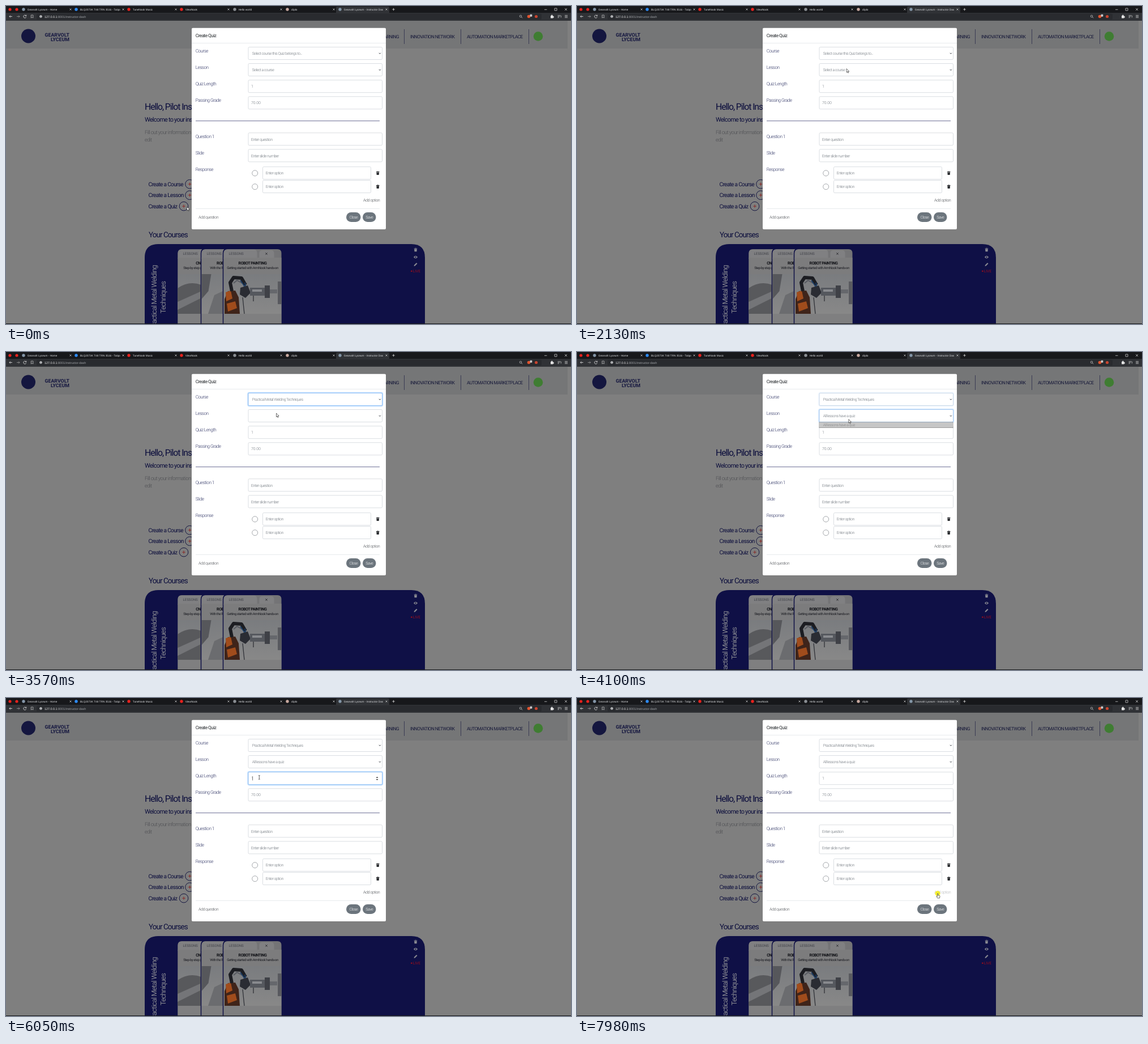
Write an HTML page that moves like this. It is 998x561 px and loops after 8 s.

```html
<!DOCTYPE html>
<html lang="en">
<head>
<meta charset="utf-8">
<title>Create Quiz</title>
<style>
html, body { margin: 0; width: 100%; height: 100%; overflow: hidden; background: #7f7f7f; }
svg { display: block; width: 998px; height: 561px; font-weight: 300; }
text { font-family: Roboto, "Liberation Sans", sans-serif; letter-spacing: -.068em; text-rendering: geometricPrecision; white-space: pre; }
.ui { font-family: "Liberation Sans", Arial, sans-serif; font-weight: 400; letter-spacing: 0; }
.wide { letter-spacing: 0; }
</style>
</head>
<body>
<svg id="stage" viewBox="0 0 998 561"></svg>
<script>
const LOOP = 8000;
const stage = document.getElementById('stage');
const COURSE = 'Practical Metal Welding Techniques';
const NO_LESSON = 'All lessons have a quiz';
const NAVY = '#0b0d3c', PANEL = '#0f1046', LABEL = '#2f3464', GREY = '#666d75';

const text = (x, y, size, fill, str, extra = '') =>
  `<text x="${x}" y="${y}" font-size="${size}" fill="${fill}" ${extra}>${str}</text>`;
const rect = (x, y, w, h, fill, extra = '') =>
  `<rect x="${x}" y="${y}" width="${w}" height="${h}" fill="${fill}" ${extra}/>`;
const dot = (x, y, r, fill, extra = '') =>
  `<circle cx="${x}" cy="${y}" r="${r}" fill="${fill}" ${extra}/>`;
const line = (d, stroke, width = 1, extra = '') =>
  `<path d="${d}" fill="none" stroke="${stroke}" stroke-width="${width}" ${extra}/>`;
const shape = (d, fill, extra = '') => `<path d="${d}" fill="${fill}" ${extra}/>`;
const group = (id, body, extra = '') => `<g id="${id}" ${extra}>${body}</g>`;
const cross = (x, y, r, color, w) =>
  line(`M${x - r} ${y - r}l${2 * r} ${2 * r}m0 ${-2 * r}l${-2 * r} ${2 * r}`, color, w);
const plus = (x, y, r, color, w) => line(`M${x - r} ${y}h${2 * r}M${x} ${y - r}v${2 * r}`, color, w);
const trash = (x, y, color) =>
  shape(`M${x - 2.8} ${y - 2.6}h1.8l.4-.7h1.2l.4.7h1.8v.9h-5.6zM${x - 2.4} ${y - 1.3}h4.8l-.4 4.6h-4z`, color);

function browser() {
  const tabs = [
    [31, 'Gearvolt Lyceum - Home', '#8496a8', 114],
    [124, 'BLQ2073K T48 TRN 3516 - Talqo', '#2d8cff', 207],
    [217, 'TuneNook Music', '#e8211d', 300],
    [310, 'ViewNook', '#e8211d', 393],
    [404, 'Hello world', '#8b8f94', 486],
    [497, 'cliplo', '#c9a9a0', 579],
    [590, 'Gearvolt Lyceum - Instructor Das', '#8496a8', 672],
  ];
  let s = rect(0, 0, 998, 12, '#17181b') + rect(0, 12, 998, 14, '#303236') +
    shape('M583 12V3q0-2 2-2h90q2 0 2 2v9z', '#303236') +
    rect(54, 13.5, 892, 10.5, '#292b2f', 'rx="2"') +
    dot(7, 6, 2.6, '#e8211d') + dot(19, 6, 2.6, '#e8211d');
  for (const [x, name, color, end] of tabs)
    s += dot(x, 6, 2.7, color) + text(x + 6.7, 7.7, 4.75, '#dcdee0', name, 'class="ui"') + cross(end, 6, 1.5, '#d8d8d8', .7);
  s += plus(684.5, 6, 2.2, '#ddd', .8) + line('M951 6.3h4.5M969 4h4v4h-4z', '#ddd', .7) + cross(989, 6, 2, '#ddd', .7);
  s += line('M11 18.5h-5m2-2l-2 2 2 2', '#e2e2e2', .8) + line('M19 18.5h5m-2-2l2 2-2 2', '#9a9a9a', .8) +
    line('M35.4 17.2a2.5 2.5 0 1 0 .3 2.2M35.8 15.6v2h-2', '#e2e2e2', .8) +
    line('M44.3 16h3.6v5l-1.8-1.4-1.8 1.4z', '#cfcfcf', .7) +
    dot(61.5, 18.5, 2.2, '#d0d2d4') + line('M61.5 17v.6m0 .5v2', '#292b2f', .6) +
    `<text class="ui" x="68" y="20.5" font-size="5.4" fill="#f0f0f0">127.0.0.1<tspan fill="#a0a3a7">:8001/instructor-dash</tspan></text>` +
    dot(909, 18, 1.8, 'none', 'stroke="#ccc" stroke-width=".7"') + line('M910.4 19.4l1.8 1.8', '#ccc', .8) +
    dot(923.5, 18.5, 2.8, '#e0542f') + rect(925.5, 14.8, 3.8, 4, '#c9cacc', 'rx=".8"') + dot(936.5, 18.5, 2.6, '#c8442f') +
    shape('M962 17h1.4a1 1 0 1 1 1.8 0h1.3v1.5a1 1 0 1 1 0 1.7v1.3h-4.5z', '#e4e4e4') +
    line('M974.5 16.8h5m-5 1.8h3.4m-3.4 1.8h2.4m3.4-3.6v3.6', '#ddd', .7) +
    line('M987 16.6h5m-5 1.9h5m-5 1.9h5', '#ddd', .7);
  return s;
}

function card(x, title, sub, scene) {
  const mid = x + 51;
  const outline = `M${x} 561V436q0-7 7-7h88q7 0 7 7v125`;
  return line(outline, PANEL, 3.5) + shape(outline + 'z', '#747476') +
    shape(`M${x} 446v-10q0-6.5 7-6.5h46q6 0 6 6v8.5h4v-8q0-5 5-5h16q5 0 5 5v10z`, '#808082') +
    rect(x, 444, 102, 29, '#7c7c7d') +
    text(x + 9, 439, 6.1, '#3f4048', 'LESSONS', 'class="wide"') + cross(x + 75.5, 437, 1.8, '#26272c', .8) +
    text(mid, 455.8, 7.1, '#101116', title, 'text-anchor="middle" font-weight="bold"') +
    text(mid, 464, 6, '#1b1c22', sub, 'text-anchor="middle"') +
    rect(x, 473, 102, 70, 'url(#photo)') + scene + rect(x, 543, 102, 18, '#7f7f80');
}

function robot() {
  return shape('M386 543v-26l6-14 13-1 6 12 2 29z', '#3f241a') +
    shape('M388 505l9-3 3 14-11 5zM390 525l15-4 3 12-16 6z', '#a04c1c') +
    line('M399 503l-3-15 6-9 14 1 7 12', '#1c1d22', 6, 'stroke-linejoin="round"') +
    line('M402 489l6-5 9 5', '#585b62', 2) +
    line('M414 484l7 10-3 13M422 488l3 14', '#1a3c66', 1.8) +
    shape('M414 497l13-4 5 13-9 9-10-6z', '#2a2c33') +
    rect(431, 497, 26, 14, '#55585e') + rect(435, 500, 17, 4, '#888a8e') +
    rect(457, 493, 9, 22, '#3f4147') + rect(466, 500, 13, 7, '#65676c') + rect(480, 486, 6.5, 40, '#595a5f') +
    line('M418 514l3 29M437 511v10', '#303238', 1.3);
}

function page() {
  const adds = [['Course', 317.5, 324.5], ['Lesson', 337, 324.5], ['Quiz', 356.5, 314]];
  let s = rect(0, 26, 998, 535, '#7f7f7f') + rect(0, 26, 992, 49, '#757677') +
    dot(39.5, 53, 12.5, '#14163f') +
    text(112, 54, 8.8, '#14163f', 'GEARVOLT', 'font-weight="bold" text-anchor="end" class="wide"') +
    text(112, 62, 8.8, '#14163f', 'LYCEUM', 'font-weight="bold" text-anchor="end" class="wide"') +
    text(694, 57.3, 8.2, '#181a3a', 'LEARNING', 'text-anchor="end"') +
    text(714, 57.3, 8.2, '#181a3a', 'INNOVATION NETWORK') +
    text(814, 57.3, 8.2, '#181a3a', 'AUTOMATION MARKETPLACE') +
    line('M703.5 41v26M803.5 41v26M923.5 41v26', '#2c2e4c', .8) +
    dot(940, 53.5, 8.3, '#3f7d32') +
    text(245, 182.5, 15.8, NAVY, 'Hello, Pilot Instructor') +
    text(245, 204.3, 10.9, NAVY, 'Welcome to your instructor dashboard') +
    text(245, 225.5, 9.4, '#4d4e52', 'Fill out your information or', 'font-weight="300"') +
    text(245, 239, 9.2, '#4d4e52', 'edit', 'font-weight="300"');
  for (const [name, y, x] of adds)
    s += text(251.5, y, 10.1, NAVY, 'Create a ' + name) +
      dot(x, y - 3.3, 7.8, 'none', `stroke="${NAVY}" stroke-width=".9"`) + plus(x, y - 3.3, 2.8, '#8a2320', .9);
  s += text(252, 407.5, 13.4, NAVY, 'Your Courses') +
    shape('M245 561V444q0-24 24-24h447q24 0 24 24v117z', PANEL);
  const side = [['Practical Metal Welding', 266], ['Techniques', 281.5]];
  for (const [str, x] of side)
    s += text(0, 0, 12.7, '#85868f', str, `text-anchor="middle" transform="translate(${x} 514) rotate(-90)"`);
  s += card(303.5, 'CNC MILLING', 'Step-by-step guide to machine setup',
      shape('M303 498q20-14 42-6v51h-42z', '#58595c') + shape('M303 522l40-18v12l-40 20z', '#747578')) +
    card(345.5, 'ROBOT WELDING', 'With the Robot arm learn joining',
      shape('M345.5 473h17l-5 30-12 14z', '#56575b') + shape('M357 543l11-33 17-8v41z', '#6b6c6f')) +
    card(384.5, 'ROBOT PAINTING', 'Getting started with ArmNook hands-on', robot());
  s += trash(723.5, 430, '#8a8a92') +
    shape('M720 443q3.5-4.5 7 0q-3.5 4.5-7 0z', '#8a8a92') + dot(723.5, 443, 1.2, PANEL) +
    shape('M720.5 459l.5-2 4-4 1.5 1.5-4 4z', '#8a8a92') +
    dot(716.3, 467.8, 1.3, '#9b0d1c') + text(718.8, 470, 6.5, '#9b0d1c', 'LIVE', 'class="wide"') +
    rect(0, 560, 998, 1, '#17181b');
  return group('page', s, 'font-weight="400"');
}

const field = (y, x = 428, w = 236.5) => rect(x, y, w, 22, '#fff', 'rx="1.8" stroke="#c6ccd3" stroke-width=".65"');
const chevron = y => line(`M658.8 ${y}l1.6 1.6 1.6-1.6`, '#343a40', 1);
const ring = (id, y) => group(id,
  rect(427.1, y - .9, 238.3, 23.8, 'none', 'rx="2.5" stroke="#007bff" stroke-opacity=".25" stroke-width="1.6"') +
  rect(428, y, 236.5, 22, 'none', 'rx="1.8" stroke="#80bdff" stroke-width=".65"'));
const spinner = (id, y) => group(id, shape(`M653.5 ${y - 1}l2-2.2 2 2.2zM653.5 ${y + 1}l2 2.2 2-2.2z`, '#444'));

function modal() {
  const labels = [['Course', 82], ['Lesson', 111.3], ['Quiz Length', 140.3], ['Passing Grade', 169.3],
    ['Question 1', 233.3], ['Slide', 262.3], ['Response', 291.3]];
  let s = rect(328, 38.7, 343, 355.3, '#fff', 'rx="2"') + text(334.8, 54.5, 8.3, '#212529', 'Create Quiz', 'font-weight="400"') +
    line('M328 65.5h343M335 357.5h325', '#dee2e6', .7) + line('M335 202.7h325', '#2b2f66', .7);
  for (const [str, y] of labels) s += text(334.8, y, 8.2, LABEL, str);
  for (const y of [72.5, 101.5, 130.7, 159.8, 223.8, 252.9]) s += field(y);
  for (const y of [283.7, 307.6])
    s += field(y, 453.5, 191) + text(458.8, y + 13.5, 6.9, GREY, 'Enter option') +
      dot(439.7, y + 11.2, 5, '#fff', 'stroke="#8d9196" stroke-width=".8"') + trash(656.7, y + 11, '#2b2d30');
  s += ring('ringCourse', 72.5) + ring('ringLesson', 101.5) + ring('ringLength', 130.7) +
    text(434.8, 86, 6.8, GREY, '', 'id="course"') + text(434.8, 115.2, 6.8, GREY, '', 'id="lesson"') +
    chevron(82.8) + chevron(111.9) +
    text(433, 144.3, 6.9, GREY, '1') + text(433, 173.4, 6.9, GREY, '70.00', 'class="wide"') +
    text(433, 237.5, 7, GREY, 'Enter question') + text(433, 266.5, 7, GREY, 'Enter slide number') +
    spinner('spinLength', 142) + spinner('spinGrade', 171) + group('caret', line('M435.6 138v7.5', '#333', .6)) +
    text(631, 344.7, 7.2, '#4a4d52', 'Add option', 'id="addOption"') +
    text(340, 375.2, 7.1, '#4a4d52', 'Add question') +
    rect(601, 364, 25.5, 17, '#6c757d', 'rx="8.5"') + text(613.8, 375.2, 7, '#fff', 'Close', 'text-anchor="middle"') +
    rect(630, 364, 23.5, 17, '#6c757d', 'rx="8.5"') + text(641.7, 375.2, 7, '#fff', 'Save', 'text-anchor="middle"');
  const list = (y, h) => rect(428, y, 236, h, '#fff', 'stroke="#777" stroke-width=".8"');
  s += group('listCourse', list(94.9, 18.3) + rect(428.4, 95.3, 235.2, 8.8, '#c6c6c6', 'id="optFirst"') +
    rect(428.4, 104.2, 235.2, 8.7, '#c6c6c6', 'id="optSecond"') +
    text(434.8, 102.2, 6.8, '#858585', 'Select course this Quiz belongs to...') +
    text(434.8, 111, 6.8, '#4c525e', COURSE));
  s += group('listLesson', list(124, 9.6) + rect(428.4, 124.4, 235.2, 8.8, '#c6c6c6') +
    text(434.8, 131.3, 6.8, '#858585', NO_LESSON));
  return s;
}

const cursors = dot(637, 344.8, 4.6, '#f4ee00', 'id="press" opacity=".8"') +
  group('arrow', shape('M0 0v6.6l1.5-1.4 1 2.3 1-.4-1-2.3h2.1z', '#fff', 'stroke="#111" stroke-width=".6"')) +
  group('beam', line('M-1.4-3.4h1.1l.3.3.3-.3h1.1M0-3v6M-1.4 3.4h1.1l.3-.3.3.3h1.1', '#222', .7)) +
  group('hand', shape('M-.7 0q.7-.8 1.4 0v2.8l2.3.6q.8.3.7 1.1l-.5 3.3h-3.7l-2-3q.3-.9 1.8.1z', '#fff', 'stroke="#111" stroke-width=".6"'));

stage.innerHTML = `<defs><linearGradient id="photo" x2="0" y2="1"><stop stop-color="#7a7c7f"/><stop offset="1" stop-color="#888"/></linearGradient></defs>` +
  page() + browser() + modal() + cursors;

// Pointer stops: time, x, y
const path = [
  [0, 319.7, 354.3], [150, 319.7, 354.3], [740, 424, 220], [950, 424, 220], [1210, 439.5, 202.7],
  [1690, 475, 166], [1790, 475, 166], [2310, 476.5, 90.6], [3150, 476.5, 90.6], [3400, 477.5, 108],
  [3620, 477.5, 108], [3830, 479, 127], [3970, 479, 127], [4130, 480, 118], [4340, 480.5, 128.3],
  [4740, 480.5, 128.3], [4770, 481, 128.5], [5030, 481, 128.5], [5240, 439.5, 131.2], [5420, 383, 135],
  [5500, 383, 135], [5750, 447.3, 140], [6290, 447.3, 140], [6480, 390, 150], [6560, 390, 150],
  [7040, 600, 357], [7140, 600, 357], [7350, 622, 366.5], [7600, 643, 350], [7880, 637.3, 345.2], [LOOP, 637.3, 345.2],
];
const parts = {};
stage.querySelectorAll('[id]').forEach(el => parts[el.id] = el);
const clamp = v => Math.max(0, Math.min(1, v));
const fade = (t, on, off) => clamp((t - on) / 150) * (1 - clamp((t - off) / 150));
const show = (id, on) => parts[id].setAttribute('visibility', on ? 'visible' : 'hidden');
const alpha = (id, v) => parts[id].setAttribute('opacity', v);
const within = (v, a, b) => v >= a && v < b;

function pointerAt(t) {
  const i = path.findIndex(p => p[0] > t);
  const [t0, x0, y0] = path[i - 1], [t1, x1, y1] = path[i];
  const k = (1 - Math.cos(Math.PI * (t - t0) / (t1 - t0))) / 2;
  return [x0 + (x1 - x0) * k, y0 + (y1 - y0) * k];
}

function draw(t) {
  const [x, y] = pointerAt(t);
  const openCourse = within(t, 2580, 3450), openLesson = within(t, 4040, 5450);
  const inRow = within(x, 428, 664) && !openLesson;
  const onLength = inRow && within(y, 130.7, 153), onGrade = inRow && within(y, 160, 182);
  const onInput = onLength || onGrade || inRow && (within(y, 224, 246) || within(y, 253, 275)) ||
    within(x, 453, 645) && (within(y, 284, 306) || within(y, 308, 330));
  const onAdd = within(x, 630, 661) && within(y, 338, 350);
  const onButton = within(y, 364, 381) && (within(x, 601, 627) || within(x, 630, 654));
  const kind = onAdd || onButton ? 'hand' : onInput ? 'beam' : 'arrow';

  for (const id of ['arrow', 'beam', 'hand']) show(id, id === kind);
  parts[kind].setAttribute('transform', `translate(${x} ${y})`);
  alpha('ringCourse', fade(t, 2540, 3990));
  alpha('ringLesson', fade(t, 3990, 5560));
  alpha('ringLength', fade(t, 5880, 6540));
  show('caret', within(t, 5900, 6540));
  show('spinLength', onLength || within(t, 5900, 6540));
  show('spinGrade', onGrade);
  show('listCourse', openCourse);
  show('listLesson', openLesson);
  show('optFirst', openCourse && y < 104.2);
  show('optSecond', openCourse && y >= 104.2);
  show('press', t >= 7980);
  parts.addOption.setAttribute('fill', onAdd ? '#b4b6b9' : '#4a4d52');
  parts.course.textContent = t < 3450 ? 'Select course this Quiz belongs to...' : COURSE;
  parts.lesson.textContent = t < 3450 ? 'Select a course' : t < 3640 ? '' : NO_LESSON;
}

const start = performance.now();
function tick() {
  draw((performance.now() - start) % LOOP);
  requestAnimationFrame(tick);
}
tick();
</script>
</body>
</html>
```
